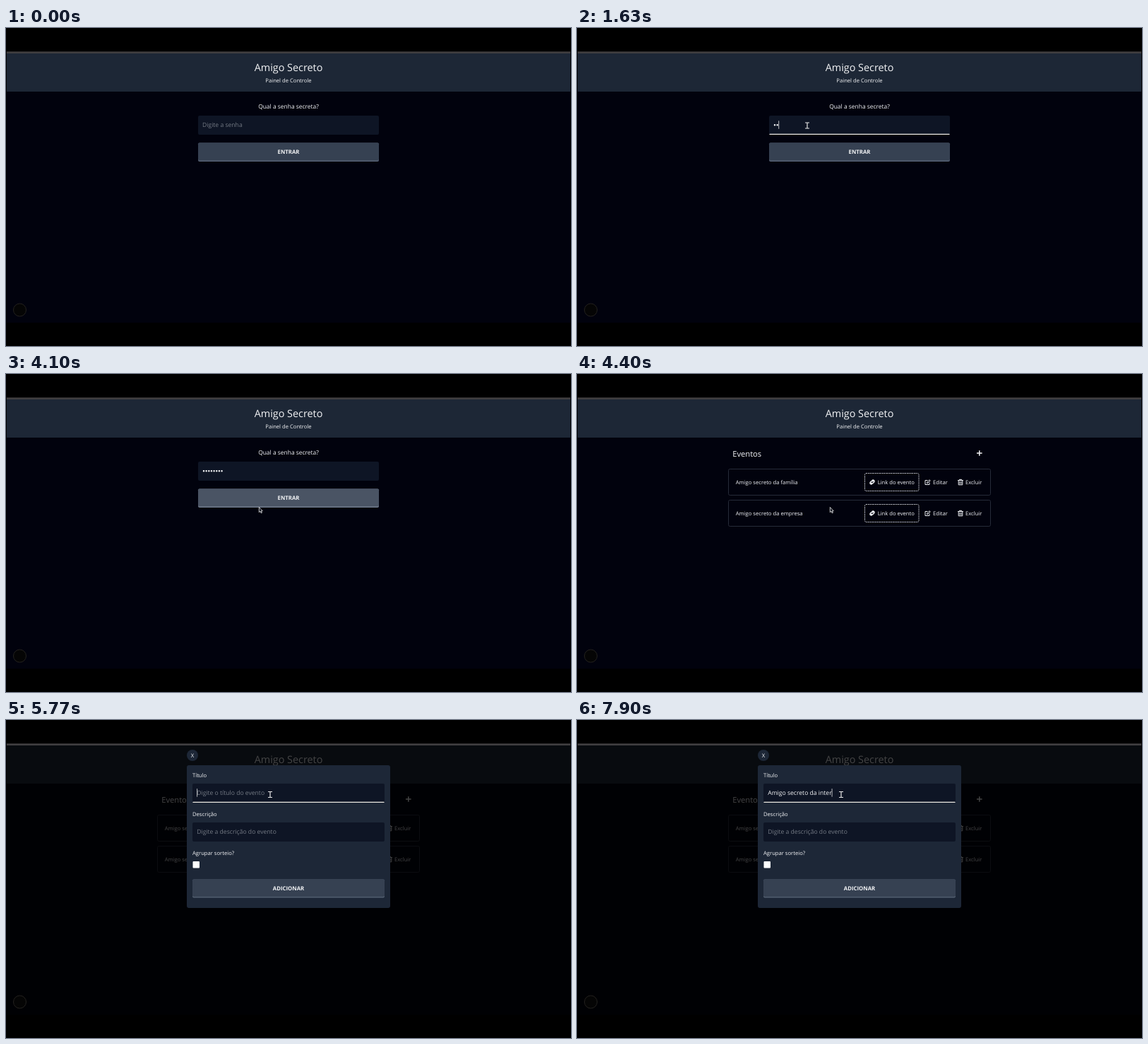
These frames come from a looping animation (800 by 450 pixels, 8000 ms). An HTML page:

```html
<!DOCTYPE html>
<html lang="pt-BR">
<head>
<meta charset="utf-8">
<title>Amigo Secreto</title>
<style>
html, body { margin: 0; width: 100%; height: 100%; overflow: hidden; background: #000; }
svg { display: block; width: 100vw; height: 100vh; }
text { font: 7.65px "Open Sans", "Noto Sans", sans-serif; fill: #f3f4f6; text-rendering: geometricPrecision; }
.mid { text-anchor: middle; }
.title { font-size: 14.4px; }
.head { font-size: 11.2px; }
.ask { font-size: 8.45px; }
.field { font-size: 8.6px; }
.hint { font-size: 8.6px; fill: #747a84; }
.cap { font-size: 7.8px; font-weight: 700; text-anchor: middle; }
.box { fill: #0e1525; }
.edge { fill: #596576; }
.face { fill: #364152; }
.hover .edge { fill: #727d8d; }
.hover .face { fill: #4a5464; }
.line { stroke: #ece9e2; stroke-width: 1.3; stroke-linecap: round; }
.row { fill: none; stroke: #262b38; }
.icon { fill: none; stroke: #eceef1; stroke-width: 1; stroke-linejoin: round; stroke-linecap: round; }
</style>
</head>
<body>
<svg viewBox="0 0 800 450">
  <defs>
    <g id="actions">
      <rect x="407.5" y="140.5" width="76.5" height="25" rx="2" fill="none" stroke="#d9dbdf" stroke-dasharray="1.5 1"/>
      <g class="icon">
        <path stroke-width="1.5" d="M417 154.2l-1.4 1.3a1.5 1.5 0 0 1-.4-2.1l1.5-1.5a1.6 1.6 0 0 1 2.3 0M418.900 151.800l1.400-1.300a1.600 1.600 0 0 0-2.300 0M417 154.200a1.600 1.600 0 0 0 2.300 0l1.500-1.500a1.600 1.600 0 0 0-.5-2.200M415.600 155.500a1.600 1.600 0 0 0 2 .2"/>
        <path d="M496 150.500h-3v6h6v-2.500M495.700 154.300l.3-1.600 3-3 1.200 1.200-3 3z"/>
        <path d="M539.500 150.500h7M541.500 150.300v-1h3v1M540.200 150.500v6.300h5.600v-6.300M542 152.300v3M544 152.300v3"/>
      </g>
      <text x="425.700" y="155.900">Link do evento</text>
      <text x="504" y="155.900">Editar</text>
      <text x="550" y="155.900">Excluir</text>
    </g>
  </defs>

  <rect width="800" height="450"/>
  <rect x="1" y="34" width="798" height="383" fill="#01020d"/>
  <rect x="1" y="36" width="798" height="54" fill="#1d2736"/>
  <text class="title mid" x="400" y="61">Amigo Secreto</text>
  <text class="mid" x="400" y="76.800">Painel de Controle</text>

  <g id="login">
    <text class="ask mid" x="400" y="114.300">Qual a senha secreta?</text>
    <rect class="box" x="272" y="124" width="256" height="27" rx="2"/>
    <text class="hint" id="passHint" x="278" y="140.200">Digite a senha</text>
    <path id="dots" fill="none" stroke="#f3f4f6" stroke-width="2.500" stroke-linecap="round" stroke-dasharray="0 3.650"/>
    <path class="line" id="passLine" d="M273 150.400H527"/>
    <g id="enter">
      <rect class="edge" x="272" y="162.500" width="256" height="26.500" rx="2"/>
      <rect class="face" x="272" y="162.500" width="256" height="25" rx="2"/>
      <text class="cap" x="400" y="177.800">ENTRAR</text>
    </g>
  </g>

  <g id="events">
    <text class="head" x="220.200" y="116.800">Eventos</text>
    <rect id="plusBg" x="559.500" y="102" width="20" height="20" rx="2" fill="#1d2736"/>
    <path d="M566 112h7.600M569.800 108.200v7.600" stroke="#f3f4f6" stroke-width="1.500"/>
    <rect class="row" x="214.500" y="134.500" width="371" height="37" rx="2"/>
    <text x="224.700" y="155.900">Amigo secreto da família</text>
    <use href="#actions"/>
    <rect class="row" x="214.500" y="178.500" width="371" height="37" rx="2"/>
    <text x="224.700" y="199.900">Amigo secreto da empresa</text>
    <use href="#actions" y="44"/>
  </g>

  <g id="modal">
    <rect x="1" y="36" width="798" height="381" opacity=".72"/>
    <circle cx="264" cy="50" r="8" fill="#1d2737"/>
    <text class="mid" x="264" y="53">X</text>
    <rect x="256" y="64" width="288" height="202" rx="3" fill="#1d2737"/>
    <text x="264" y="80.800">Título</text>
    <rect class="box" x="264" y="90" width="272" height="27" rx="2"/>
    <text class="hint" id="titleHint" x="270.200" y="106.200">Digite o título do evento</text>
    <text class="field" id="typed" x="270.200" y="106.200"></text>
    <path class="line" id="titleLine" d="M265 116.400H535"/>
    <text x="264" y="135.800">Descrição</text>
    <rect class="box" x="264" y="145" width="272" height="27" rx="2"/>
    <text class="hint" x="270.200" y="161.200">Digite a descrição do evento</text>
    <text x="264" y="190.700">Agrupar sorteio?</text>
    <rect x="264.500" y="200" width="9.500" height="9.500" rx="1" fill="#fff"/>
    <rect class="edge" x="264" y="225.500" width="272" height="26" rx="2"/>
    <rect class="face" x="264" y="225.500" width="272" height="24.700" rx="2"/>
    <text class="cap" x="400" y="240.800">ADICIONAR</text>
  </g>

  <rect x="1" y="33.300" width="798" height="2.700" fill="#403e40"/>
  <circle cx="19.500" cy="399" r="9" fill="#050505" stroke="#24221f"/>
  <path id="caret" d="M0 0v11.500" stroke="#e9e9e9" stroke-width=".8"/>
  <g id="cursor">
    <path id="beam" fill="none" stroke="#e6e6e6" stroke-width="1.200" d="M-3-4H3M-3 4H3M0-4V4"/>
    <path id="arrow" fill="#11151d" stroke="#eee" stroke-width=".8" d="M0 0V7.200L1.700 5.700 2.900 8.300 4.100 7.800 2.900 5.300H5z"/>
    <path id="hand" fill="#11151d" stroke="#eee" stroke-width=".9" stroke-linejoin="round" d="M-1 5.500V.6Q0-.6 1 .6V3.500Q4.500 3.500 4.500 5V7.500L3.500 10H-1.500L-3.500 6.500Q-3-.5 5-1 5.500z"/>
  </g>
</svg>
<script>
const $ = id => document.getElementById(id);
const show = (id, on) => $(id).style.display = on ? "" : "none";

const LOOP = 8000, FOCUS = 720, BLUR = 3950, LIST = 4150, OPEN = 5470, EDIT = 5770;
const title = "Amigo secreto da inter";
const passKeys = [1330, 1590, 1830, 2230, 2530, 2650, 2770, 2930];
const titleKeys = [5970, 6100, 6200, 6320, 6570, 6690, 6700, 6800,
  ...Array.from({ length: 11 }, (_, i) => 6970 + i * 75), 7800, 7840, 7900];
// time, x, y
const path = [[150, 372, 225], [600, 326, 138], [3470, 326, 138], [3850, 358.300, 188.500],
  [4900, 358.300, 188.500], [5320, 565, 113.500], [5480, 565, 113.500], [5700, 374, 105.500], [8000, 374, 105.500]];

const ease = p => p * p * (3 - 2 * p);

function cursorAt(t) {
  const i = Math.max(1, path.findIndex(k => k[0] >= t));
  const [t0, x0, y0] = path[i - 1], [t1, x1, y1] = path[i];
  const p = ease(Math.max(0, (t - t0) / (t1 - t0)));
  return [x0 + (x1 - x0) * p, y0 + (y1 - y0) * p];
}

const count = (keys, t) => keys.filter(k => k <= t).length;
const blink = (keys, start, t) => {
  const last = Math.max(start, ...keys.filter(k => k <= t));
  return (t - last) % 1000 < 500;
};

function draw(t) {
  const login = t < LIST, modal = t >= OPEN;
  const [x, y] = cursorAt(t);
  const within = (l, top, r, b) => x >= l && x <= r && y >= top && y <= b;
  const inPass = login && t >= FOCUS && t < BLUR, inTitle = t >= EDIT;

  show("login", login);
  show("events", !login);
  show("modal", modal);

  const n = count(passKeys, t);
  show("passHint", !n);
  show("dots", n);
  $("dots").setAttribute("d", `M280 137.300h${Math.max(0, n - 1) * 3.65 + 0.1}`);
  show("passLine", inPass);
  const onEnter = login && t > 150 && within(272, 162, 528, 189);
  $("enter").setAttribute("class", onEnter ? "hover" : "");

  const onPlus = !login && !modal && within(559, 102, 580, 122);
  show("plusBg", onPlus);

  const m = count(titleKeys, t);
  $("typed").textContent = title.slice(0, m);
  show("titleHint", !m);
  show("titleLine", inTitle);

  const lit = inPass ? blink(passKeys, FOCUS, t) : inTitle && blink(titleKeys, EDIT, t);
  show("caret", lit);
  if (lit) {
    // A trailing space is not measured, so add its advance.
    const gap = title[m - 1] === " " ? 2.23 : 0;
    const text = title.slice(0, m).trimEnd();
    $("typed").textContent = text;
    const cx = inPass ? 278.4 + n * 3.65 : 270.6 + $("typed").getComputedTextLength() + gap;
    $("caret").setAttribute("transform", `translate(${cx} ${inPass ? 131.3 : 97.2})`);
  }

  const onText = login ? within(272, 124, 528, 151) : modal && within(264, 90, 536, 117);
  show("cursor", t >= 150);
  show("beam", onText);
  show("hand", onPlus);
  show("arrow", !onText && !onPlus);
  $("cursor").setAttribute("transform", `translate(${x} ${y})`);
}

const start = performance.now();
function tick() {
  draw((performance.now() - start) % LOOP);
  requestAnimationFrame(tick);
}
tick();
</script>
</body>
</html>
```
